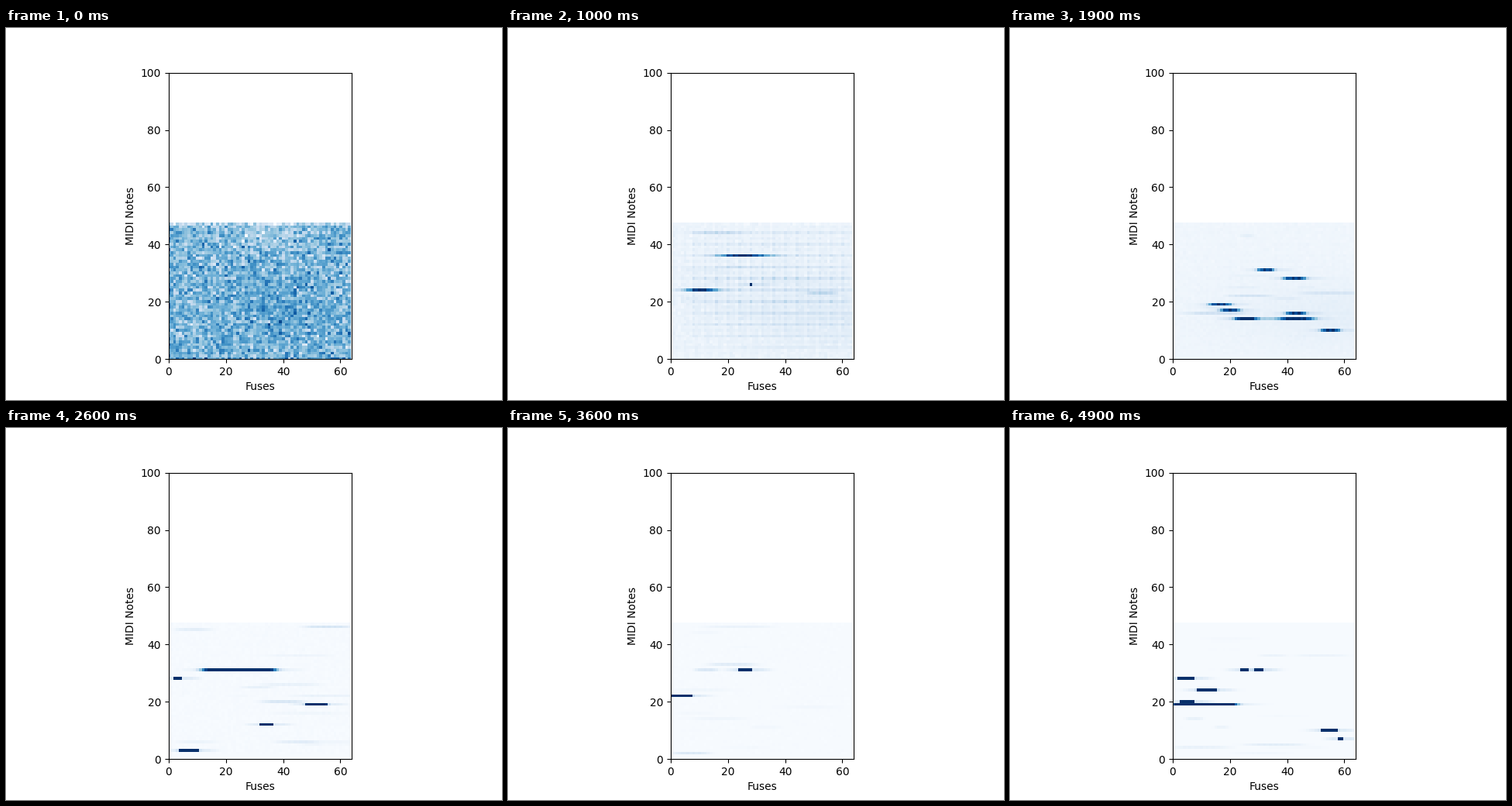
These frames come from a looping animation (640x480 px, 5.2 s). A matplotlib script:

```python
import numpy as np
import matplotlib.pyplot as plt
from matplotlib.animation import FuncAnimation

ROWS, COLS = 48, 64
STEPS, FRAMES, INTERVAL = 50, 52, 100

# Training step: (loudness, [(pitch, first column, last column), ...])
SCENES = {
    4: (0, []),
    10: (.9, [(36, 18, 32), (24, 6, 15), (26, 28, 28)]),
    19: (.85, [(19, 13, 20), (17, 17, 23), (14, 22, 29), (16, 40, 46),
               (14, 38, 49), (31, 30, 35), (10, 52, 58), (28, 39, 46)]),
    26: (1.2, [(31, 12, 37), (3, 4, 10), (19, 48, 55), (12, 32, 36),
               (28, 2, 4)]),
    36: (1.4, [(22, 0, 7), (31, 24, 28)]),
    49: (1.3, [(28, 2, 7), (24, 9, 15), (19, 0, 22), (20, 3, 7),
               (31, 24, 26), (31, 29, 31), (10, 52, 57), (7, 58, 59)]),
}

row = np.arange(ROWS)[:, None]
col = np.arange(COLS)[None, :]


def hump(x, y, width, height):
    return np.exp(-((col - x) / width) ** 2 - ((row - y) / height) ** 2)


def make_grid():
    """Checkerboard left by the upsampling of an untrained network."""
    by_row = .2 + .25 * (row % 2 == 0) + .2 * (row % 4 == 0) + .2 * (row % 8 == 4)
    dots = by_row * (.3 + .8 * hump(33, 27, 50, 19))
    inside = (col >= 8) & (row >= 8) & (row < 46)
    dots = dots * np.where(inside, 1, .3)
    stripes = .06 + .1 * np.isin(col % 4, [1, 2]) + .05 * (row % 2 == 0)
    return np.where(col % 4 == 0, .08 + dots, stripes + .2 * dots)


def make_noise(rng):
    values = rng.normal(.46, .13, (ROWS, COLS))
    values += .07 * hump(38, 17, 16, 12) - .15 * hump(33, 45, 12, 7)
    values += .25 * (row == 0) * (col % 2) - .16 * (row == ROWS - 1)
    return values + .12 * (col == 0)


GRID = make_grid()
NOISE = make_noise(np.random.default_rng(5))


def add_note(field, pitch, start, end, strength, power):
    x = np.arange(COLS)
    reach = np.abs(x - (start + end) / 2) / ((end - start) / 2 + .5)
    ripple = 1 - .12 * (x % 2) * (strength < 1)
    field[pitch] += strength * ripple * np.exp(-reach ** power)


def notes_at(step):
    """Notes of the last scene drop out as those of the next come in."""
    keys = list(SCENES)
    index = int(np.clip(np.searchsorted(keys, step) - 1, 0, len(keys) - 2))
    begin, finish = keys[index:index + 2]
    t = np.clip((step - begin) / (finish - begin), 0, 1)
    rng = np.random.default_rng(100 + index)

    notes = []
    for key, leaving in ((begin, True), (finish, False)):
        loudness, scene = SCENES[key]
        for note in scene:
            switch = rng.uniform(.05, .95)
            if (switch > t) == leaving:
                notes.append((*note, loudness))

    for _ in range(12):
        birth, life = rng.uniform(0, .85), rng.uniform(.15, .4)
        start, length = rng.integers(0, 56), rng.integers(2, 9)
        pitch, strength = rng.integers(3, 37), rng.uniform(.2, 1.3)
        if begin > 4 and t < 1 and birth < t < birth + life:
            notes.append((pitch, start, start + length, strength))
    return notes


def roll_at(step):
    rng = np.random.default_rng(step)
    maturity = np.clip((step - 4) / 22, 0, 1)
    chaos = max(0, 1 - step / 4) ** 1.3
    grid = step / 4 if step < 4 else .75 ** (step - 4)
    base = .035 * np.sin(np.pi * maturity) + .006 * maturity
    grain = .03 * np.exp(-step / 12)

    jitter = rng.normal(0, 1, (ROWS, COLS)) * ((row > 1) | (step < 12))
    field = chaos * NOISE + grid * GRID + base
    field += (grain + .3 * chaos) * (1 - chaos) * jitter
    field += .06 * np.sin(np.pi * maturity) * hump(60, 15, 40, 12)
    field += .35 * grid * (row % 4 == 0) * hump(40, 25, 30, 25) * (step > 4)

    power = 2 + 6 * maturity ** 3
    for pitch, start, end, strength in notes_at(step):
        add_note(field, pitch, start, end, strength, power)
        add_note(field, pitch, start - 4, end + 6, .1 * strength, 4)

    # Faint traces that change with every step.
    for _ in range(14 if step > 6 else 0):
        start, length = rng.integers(0, 50), rng.integers(4, 25)
        add_note(field, rng.integers(2, 47), start, start + length,
                 min(.2, rng.exponential(.05)), 4)
    return np.clip(field, 0, 1)


fig, ax = plt.subplots(figsize=(6.4, 4.8), dpi=100)
image = ax.imshow(roll_at(0), cmap="Blues", vmin=0, vmax=1,
                  origin="lower", interpolation="nearest")
ax.set(xlim=(0, 64), ylim=(0, 100), xlabel="Fuses", ylabel="MIDI Notes")


def draw(frame):
    image.set_data(roll_at(min(frame, STEPS - 1)))
    return [image]


anim = FuncAnimation(fig, draw, frames=FRAMES, init_func=lambda: draw(0),
                     interval=INTERVAL, repeat=True, repeat_delay=0)
plt.show()
```
